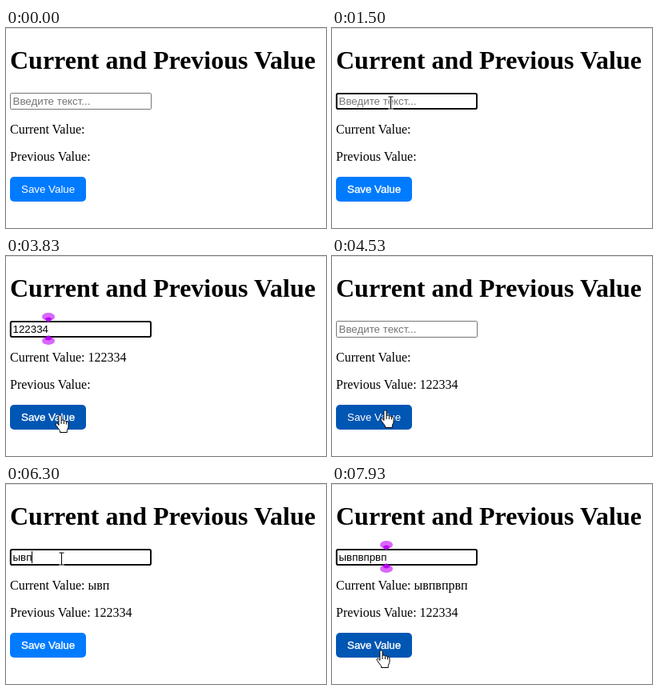
Write an HTML page that moves like this. It is 400 px wide and 250 px high and loops after 8 s.

```html
<!DOCTYPE html>
<html lang="en">
<head>
<meta charset="utf-8">
<title>Current and Previous Value</title>
<style>
html, body { margin: 0; width: 100%; height: 100%; overflow: hidden; background: #fff; }
svg { display: block; width: 400px; height: 250px; }
.serif { font: 16px "Liberation Serif", "Times New Roman", serif; }
.title { font-size: 32px; font-weight: bold; }
.sans { font: 13.333px "Liberation Sans", Arial, sans-serif; }
</style>
</head>
<body>
<svg viewBox="0 0 400 250" xmlns="http://www.w3.org/2000/svg">
  <rect width="400" height="250" fill="#fff"/>
  <rect width="400" height="1" fill="#dcdcdc"/>
  <text class="serif title" x="5" y="51">Current and Previous Value</text>
  <rect id="border" x="5.5" y="81.5" width="176" height="20" rx="1" fill="#fff" stroke="#767676"/>
  <rect id="ring" x="5.8" y="82" width="175.2" height="19" rx="1.8" fill="#fff" stroke="#101010" stroke-width="2"/>
  <text id="hint" class="sans" x="8.5" y="96" fill="#757575">Введите текст...</text>
  <text id="typed" class="sans" x="8.5" y="96"></text>
  <rect id="caret" y="84" width="1" height="15"/>
  <text id="current" class="serif" x="5" y="132"></text>
  <text id="previous" class="serif" x="5" y="166"></text>
  <rect id="button" x="5" y="186" width="95" height="31" rx="5"/>
  <text id="label" class="sans" x="19" y="206" fill="#fff" stroke="#fff">Save Value</text>
  <g id="marker">
    <g id="drop">
      <ellipse cy="76" rx="8" ry="5" fill="#c81eff" opacity=".68"/>
      <path d="M-4.5 78.5Q0 74.5 4.5 78.5L1 82.5H-1Z" fill="#b400f0" opacity=".9"/>
    </g>
    <use href="#drop" transform="matrix(1 0 0 -1 0 182)"/>
  </g>
  <g id="cursor">
    <g id="beam" fill="none">
      <path d="M-3-7.5H3M0-7.5V7.5M-3 7.5H3" stroke="#fff" stroke-width="2.6"/>
      <path d="M-3-7.5H3M0-7.5V7.5M-3 7.5H3" stroke="#000"/>
    </g>
    <path id="arrow" d="M0 0V16L3.7 12.5L6 18L8.5 17L6.2 11.5H11Z" fill="#fff" stroke="#000"/>
    <g id="hand" stroke="#000" stroke-linejoin="round">
      <path d="M-1.6 13V1.9C-1.6-.1 1.6-.1 1.6 1.9V7.2C2.2 6 4.7 6.2 4.9 7.9C5.8 7 7.7 7.4 7.9 9C9 8.3 10.5 8.9 10.5 10.4V14.5C10.5 17 8.8 18 8.8 20V22H0V20C-1.6 17.6-3.6 15.5-5.3 12.7C-6.2 11-4.3 9.9-3.1 11Z" fill="#fff"/>
      <path d="M1.6 7V11.5M4.9 8V11.5M7.9 9V12" fill="none"/>
    </g>
  </g>
</svg>
<script>
const LOOP = 8000, BLINK = 530, LAG = 35;
const el = {};
document.querySelectorAll('[id]').forEach(node => el[node.id] = node);

// One entry per input session: focus and blur times, then [time, value] keystrokes.
const sessions = [
  { focus: 970, blur: 4430, clear: 4530, keys: [
    [1870, '1'], [2130, '12'], [2430, '1223'], [2670, '12233'], [2930, '122334']] },
  { focus: 5330, blur: LOOP, clear: LOOP, keys: [
    [6300, 'ывп'], [6570, 'ывпв'], [6700, 'ывпвп'], [6830, 'ывпвпр'], [6970, 'ывпвпрвп']] }
];

const easeOut = p => 1 - (1 - p) ** 3;
const easeInOut = p => p < .5 ? 4 * p ** 3 : 1 - 4 * (1 - p) ** 3;
const moves = [
  { start: 330, end: 830, from: [332, 36], to: [73, 93], ease: easeInOut },
  { start: 3470, end: 3700, from: [73, 93], to: [68, 209], ease: easeOut },
  { start: 3700, end: 4130, from: [68, 209], to: [66, 192], ease: easeOut },
  { start: 4730, end: 5100, from: [66, 192], to: [69, 93], ease: easeInOut },
  { start: 7470, end: 7930, from: [69, 93], to: [61, 207], ease: easeOut }
];
const hovers = [[3550, 4790], [7640, LOOP]];

const clamp = v => Math.max(0, Math.min(1, v));
const mix = (a, b, p) => a + (b - a) * p;
const show = (node, on) => node.setAttribute('display', on ? 'inline' : 'none');
const setText = (node, value) => { if (node.textContent !== value) node.textContent = value; };
const lastKey = (s, t) => s && s.keys.filter(k => k[0] <= t).pop();

function caretX(value) {
  setText(el.typed, value);
  return Math.floor(9 + (value ? el.typed.getComputedTextLength() : 0));
}

function drawInput(t) {
  const s = sessions.find(s => t >= s.focus && t < s.clear);
  const focused = !!s && t < s.blur;
  const key = lastKey(s, t), marked = lastKey(s, t - LAG);
  const value = key ? key[1] : '';

  show(el.marker, focused && marked);
  if (marked) el.marker.setAttribute('transform', `translate(${caretX(marked[1])})`);
  el.caret.setAttribute('x', caretX(value));
  const since = t - (key ? key[0] + 10 : s ? s.focus : 0);
  show(el.caret, focused && Math.floor(Math.max(0, since) / BLINK) % 2 === 0);

  show(el.ring, focused);
  show(el.border, !focused);
  show(el.hint, !value);
  el.label.setAttribute('stroke-width', focused ? .4 : 0);
  setText(el.current, 'Current Value: ' + value);
  setText(el.previous, 'Previous Value: ' + (t >= sessions[0].clear ? '122334' : ''));
}

function drawButton(t) {
  let p = 0;
  for (const [enter, leave] of hovers)
    if (t >= enter) p = easeOut(clamp((t - enter) / 270)) * (1 - easeOut(clamp((t - leave) / 290)));
  el.button.setAttribute('fill', `rgb(0,${mix(123, 86, p)},${mix(255, 179, p)})`);
}

function cursorKind(x, y) {
  const inside = (left, top, right, bottom) => x >= left && x < right && y >= top && y < bottom;
  if (inside(5, 186, 100, 217)) return 'hand';
  const overText = inside(5, 22, 387, 59) || inside(5, 81, 182, 102) ||
    inside(5, 118, 100, 136) || inside(5, 152, 106, 170);
  return overText ? 'beam' : 'arrow';
}

function drawCursor(t) {
  const m = moves.filter(m => t >= m.start).pop();
  show(el.cursor, m);
  if (!m) return;
  const p = m.ease(clamp((t - m.start) / (m.end - m.start)));
  const [x, y] = [0, 1].map(i => Math.round(mix(m.from[i], m.to[i], p)));
  const kind = cursorKind(x, y);
  ['beam', 'arrow', 'hand'].forEach(id => show(el[id], id === kind));
  el.cursor.setAttribute('transform', `translate(${x + .5} ${y + .5})`);
}

function draw(t) {
  drawInput(t);
  drawButton(t);
  drawCursor(t);
}

const begin = performance.now();
function tick() {
  draw((performance.now() - begin) % LOOP);
  requestAnimationFrame(tick);
}
tick();
</script>
</body>
</html>
```
